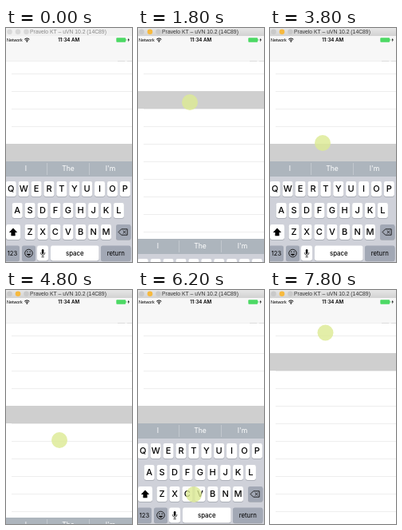
An HTML page that plays this animation: 158x293 px, repeating every 8000 ms.

```html
<!DOCTYPE html>
<html lang="en">
<head>
<meta charset="utf-8">
<style>
html, body { margin: 0; width: 100%; height: 100%; overflow: hidden; background: #fff; }
svg { display: block; width: 158px; height: 293px; }
text { font-family: Inter, "Liberation Sans", sans-serif; text-anchor: middle; }
.arial { font-family: "Liberation Sans", Arial, sans-serif; }
</style>
</head>
<body>
<svg id="stage" viewBox="0 0 158 293">
  <defs>
    <linearGradient id="chrome" x2="0" y2="1">
      <stop offset="0" stop-color="#e6e6e6"/>
      <stop offset="1" stop-color="#d2d2d2"/>
    </linearGradient>
  </defs>
  <rect width="158" height="293" fill="#fff"/>
  <g id="lines" fill="#eee"></g>
  <rect id="row" width="158" height="22" fill="#cfcfcf"/>
  <rect y="10" width="158" height="31" fill="#f7f7f7"/>
  <rect y="41" width="158" height="1" fill="#f0f0f0"/>
  <path d="M140 41.5h9m3 0h6" stroke="#dcdcdc"/>
  <g id="status">
    <text class="arial" x="1" y="17" font-size="5.4" style="text-anchor:start">Network</text>
    <g fill="none" stroke="#000" stroke-width="1">
      <path d="M23.2 14.2q3.1-2.8 6.2 0M24.5 15.6q1.8-1.5 3.6 0"/>
    </g>
    <circle cx="26.3" cy="16.9" r=".8"/>
    <text x="78.7" y="17.2" font-size="6.2" font-weight="600">11:34 AM</text>
    <rect x="138.3" y="12.3" width="11.8" height="5.4" rx="1" fill="#4cd964"/>
    <rect x="150.4" y="14" width=".8" height="1.8" fill="#4cd964"/>
    <path d="M154.2 12.5l-1.8 2.8h1.2l-.6 2.2 2-2.9h-1.2z"/>
  </g>
  <rect id="bar" width="158" height="10" fill="url(#chrome)"/>
  <g id="lights"></g>
  <text id="title" class="arial" x="78" y="7.3" font-size="6.8">Pravelo KT – uVN 10.2 (14C89)</text>
  <g id="board"></g>
  <circle id="touch" r="10" fill="#dcea92" fill-opacity=".8"/>
</svg>
<script>
const $ = id => document.getElementById(id);
const add = (parent, tag, attrs, label) => {
  const el = document.createElementNS("http://www.w3.org/2000/svg", tag);
  for (const k in attrs) el.setAttribute(k, attrs[k]);
  if (label) el.textContent = label;
  return parent.appendChild(el);
};

const LOOP = 8000, STEP = 200, ROW = 22, DOCK = 145;
const WHITE = "#fff", DARK = "#a2a8b5";

// Keyboard, drawn with its top edge at 0
const board = $("board");
const rect = (x, y, width, height, fill, rx = 0) => add(board, "rect", { x, y, width, height, fill, rx });
const key = (x, y, w, fill, label, size, weight = 400) => {
  rect(x, y + .8, w, 19, "#a3a6ae", 2.4);
  rect(x, y, w, 19, fill, 2.4);
  if (label) add(board, "text", { x: x + w / 2, y: y + 9.5 + size * .36, "font-size": size, "font-weight": weight }, label);
};
const path = (d, attrs) => add(board, "path", { d, ...attrs });

rect(0, 0, 158, 126, "#cfd1d9");
rect(0, 0, 158, 19, "#adb5bd");
["I", "The", "I'm"].forEach((word, i) =>
  add(board, "text", { x: 25 + 53 * i, y: 12.2, "font-size": 8.6, fill: WHITE }, word));
[51, 104].forEach(x => rect(x, 2, 1, 15, "#c2c8ce"));

["QWERTYUIOP", "ASDFGHJKL", "ZXCVBNM"].forEach((letters, r) =>
  [...letters].forEach((c, i) =>
    key(77.8 + (i - (letters.length - 1) / 2) * 15.9 - 6.5, 25 + 27 * r, 13, WHITE, c, 11, 500)));

key(0, 79, 18, WHITE);
path("M9 83.5l5.2 5.4h-2.6v4.3H6.4v-4.3H3.8z", { fill: "#000" });
key(138, 79, 18.5, DARK);
path("M141 88.5l3.7-3.7h7.4v7.4h-7.4zM146.8 86.8l3.4 3.4m0-3.4l-3.4 3.4", { fill: "none", stroke: "#111", "stroke-width": .9 });

key(-1, 105.5, 18, DARK, "123", 7.6);
key(20, 105.5, 17, DARK);
add(board, "circle", { cx: 28.5, cy: 115, r: 4.8, fill: "none", stroke: "#111", "stroke-width": .9 });
path("M25.5 115.8q3 4.6 6 0z", { fill: "#111" });
[26.8, 30.2].forEach(cx => add(board, "circle", { cx, cy: 113.2, r: .8, fill: "#111" }));
key(39, 105.5, 14, WHITE);
rect(44.8, 110, 2.6, 6, "#111", 1.3);
path("M43.4 114v.6a2.7 2.7 0 0 0 5.4 0v-.6M46.1 117.4v2.2M44.4 119.8h3.4", { fill: "none", stroke: "#111", "stroke-width": .7 });
key(56, 105.5, 60.5, WHITE, "space", 7.8, 500);
key(119, 105.5, 37.5, DARK, "return", 7.8);

const lights = [4.5, 15, 25.5].map(cx => add($("lights"), "circle", { cx, cy: 4.8, r: 3.3 }));
const lines = Array.from({ length: 13 }, () => add($("lines"), "rect", { x: 7, width: 151, height: 1 }));

// Each tap starts a slide; the picked row ends at DOCK when the keyboard opens
const slides = [
  { at: 1646, pick: 1600, open: false, row: 79 },
  { at: 2947, pick: 2947, open: true, row: 79 },
  { at: 4560, pick: 4560, open: false, row: DOCK },
  { at: 5787, pick: 5787, open: true, row: 255 },
  { at: 7190, pick: 7190, open: false, row: 79 }
];

// Pointer path: time, x, y
const trail = [
  [200, 81, 4], [400, 80, 22], [800, 69, 98], [1000, 66, 112], [1200, 65, 104],
  [1400, 65, 95], [1600, 65, 93], [3000, 65, 93], [3200, 65, 99], [3600, 66, 137],
  [3800, 66, 144], [4200, 66, 145], [4600, 66, 155], [4800, 67, 188], [5000, 69, 235],
  [5200, 71, 255], [5400, 70, 256], [6200, 70, 256], [6400, 69, 205], [6600, 67, 112],
  [6800, 67, 86], [7200, 67, 86], [7600, 68, 68], [7800, 69.5, 53.5]
];

const easeOut = u => 1 - (1 - Math.min(1, Math.max(0, u))) ** 3;
const mix = (a, b, u) => a + (b - a) * u;

function scene(t) {
  const s = slides.filter(o => t >= o.pick).pop();
  if (!s) return { up: 1, row: DOCK };
  const p = easeOut((t - s.at) / 400);
  return s.open ? { up: p, row: mix(s.row, DOCK, p) } : { up: 1 - p, row: s.row };
}

function pointer(t) {
  const i = trail.findIndex(k => k[0] > t);
  if (i < 0) return trail[trail.length - 1].slice(1);
  const a = trail[i - 1], b = trail[i], u = (t - a[0]) / (b[0] - a[0]);
  return [mix(a[1], b[1], u), mix(a[2], b[2], u)];
}

function draw(time) {
  const t = Math.floor(time % LOOP / STEP) * STEP;
  const { up, row } = scene(t), y = Math.floor(row);
  $("row").setAttribute("y", y);
  lines.forEach((l, i) => l.setAttribute("y", y % ROW + ROW * i));
  board.setAttribute("transform", `translate(0 ${Math.round(293 - 126 * up)})`);

  const active = t >= 1400;
  $("title").setAttribute("fill", active ? "#333" : "#888");
  $("bar").setAttribute("fill", active ? "url(#chrome)" : "#f0f0f0");
  lights.forEach((l, i) =>
    l.setAttribute("fill", !active ? "#d8d8d8" : i === 1 ? "#f6b93e" : "#c9c9c9"));

  const touch = $("touch"), shown = t >= 200;
  touch.setAttribute("visibility", shown ? "visible" : "hidden");
  if (shown) {
    const [cx, cy] = pointer(t);
    touch.setAttribute("cx", cx);
    touch.setAttribute("cy", cy);
  }
}

let start;
function tick(now) {
  start ??= now;
  draw(Math.max(0, now - start));
  requestAnimationFrame(tick);
}
draw(0);
requestAnimationFrame(tick);
</script>
</body>
</html>
```
